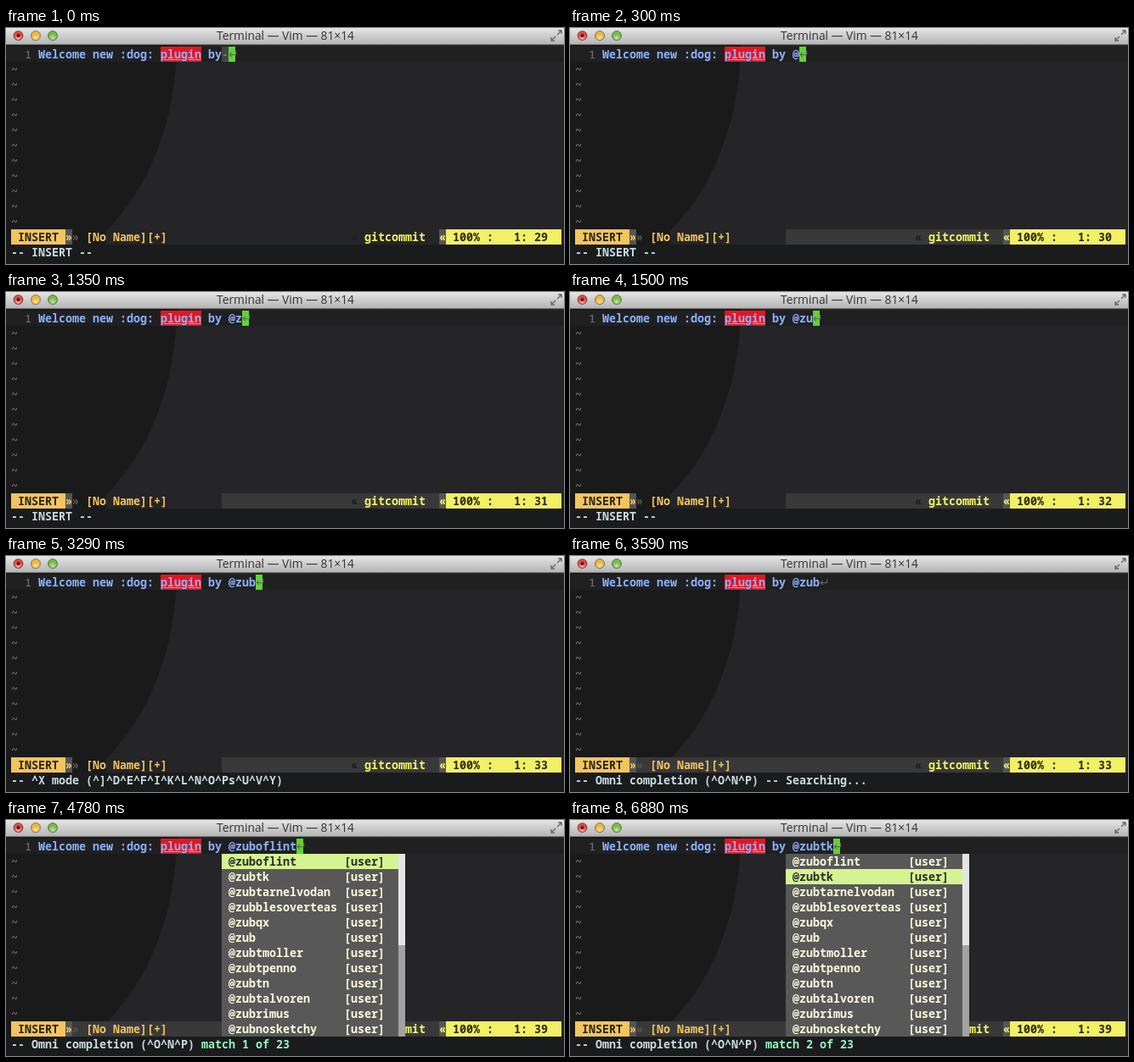
An HTML page that plays this animation: 657 px wide and 279 px high, repeating every 8000 ms.

```html
<!DOCTYPE html>
<html lang="en">
<head>
<meta charset="utf-8">
<title>Terminal</title>
<style>
  html, body { margin: 0; width: 100%; height: 100%; overflow: hidden; background: #1a1a1b; }
  #window { position: relative; width: 657px; height: 279px; overflow: hidden; }
  svg { position: absolute; left: 0; top: 0; }
  .title { font: 13.8px "Open Sans", sans-serif; fill: #333; text-anchor: middle; }
  .cell {
    position: absolute; height: 18px; white-space: pre;
    font: 600 13.3333px/18px "Noto Sans Mono", monospace;
  }
  .return { font: 14px/18px "DejaVu Sans", sans-serif; }
</style>
</head>
<body>
<div id="window">
  <svg width="657" height="279">
    <defs>
      <linearGradient id="bar" x2="0" y2="1">
        <stop stop-color="#e6e6e6"/><stop offset="1" stop-color="#b2b2b2"/>
      </linearGradient>
      <radialGradient id="shine" cy=".8">
        <stop stop-color="#fff" stop-opacity=".6"/><stop offset="1" stop-color="#fff" stop-opacity="0"/>
      </radialGradient>
    </defs>
    <rect width="657" height="279" fill="#252527"/>
    <path d="M0 20H202Q198 90 183 130Q162 195 118 240V256H0Z" fill="#1b1a1a"/>
    <rect y="22" width="657" height="18" fill="#202021"/>
    <rect y="256" width="657" height="23" fill="#1a1b1c"/>
    <rect width="657" height="20" fill="url(#bar)"/>
    <rect y="19" width="657" height="1" fill="#777"/>
    <g stroke="#0006">
      <circle cx="14.5" cy="9" r="5.5" fill="#e8463f"/>
      <circle cx="35" cy="9" r="5.5" fill="#f0b53c"/>
      <circle cx="55" cy="9" r="5.5" fill="#72bd45"/>
    </g>
    <g fill="url(#shine)">
      <circle cx="14.5" cy="9" r="5"/><circle cx="35" cy="9" r="5"/><circle cx="55" cy="9" r="5"/>
    </g>
    <circle cx="14.5" cy="9" r="2" fill="#5c0b0b"/>
    <text class="title" x="329" y="14">Terminal — Vim — 81×14</text>
    <path d="M649 8L654 3M650 3H654V7M647 10L642 15M642 11V15H646" fill="none" stroke="#666" stroke-width="1.4"/>
  </svg>
  <div id="screen"></div>
</div>
<script>
const LOOP = 8000, CELL = 8, ROW = 18, LEFT = 6, TOP = 22;
const screen = document.getElementById("screen");
const users = ["zuboflint", "zubtk", "zubtarnelvodan", "zubblesoverteas", "zubqx", "zub",
  "zubtmoller", "zubtpenno", "zubtn", "zubtalvoren", "zubrimus", "zubnosketchy"].map(name => "@" + name);

const insert = "-- INSERT --", omni = "-- Omni completion (^O^N^P) ";
const steps = [
  { at: 0, typed: "", column: 29, message: insert },
  { at: 300, typed: "@", column: 30, message: insert },
  { at: 1350, typed: "@z", column: 31, message: insert },
  { at: 1500, typed: "@zu", column: 32, message: insert },
  { at: 2400, typed: "@zub", column: 33, message: insert },
  { at: 3290, typed: "@zub", column: 33, message: "-- ^X mode (^]^D^E^F^I^K^L^N^O^Ps^U^V^Y)" },
  { at: 3590, typed: "@zub", column: 33, message: omni + "-- Searching...", busy: true },
  { at: 4780, typed: users[0], column: 39, message: omni, pick: 0 },
  { at: 6880, typed: users[1], column: 39, message: omni, pick: 1 },
];

function put(column, row, text, color, background = "transparent") {
  const cell = document.createElement("span");
  cell.className = "cell";
  cell.textContent = text;
  Object.assign(cell.style, {
    left: LEFT + column * CELL + "px", top: TOP + row * ROW + "px", color, background,
  });
  screen.append(cell);
  return cell;
}

function fill(column, row, columns, rows, color) {
  const box = put(column, row, "", "", color);
  box.style.width = columns * CELL + "px";
  box.style.height = rows * ROW + "px";
}

function drawText({ typed, busy }) {
  const blue = "#8ab2ff", end = 32 + typed.length;
  put(2, 0, "1", "#777").style.fontWeight = 400;
  put(4, 0, "Welcome new :dog: ", blue);
  put(22, 0, "plugin", blue, "#e5151f").style.textDecoration = "underline";
  put(28, 0, " by " + typed, blue);
  if (!typed) put(31, 0, "-", "#777", "#444");
  if (!busy) fill(end, 0, 1, 1, "#5fd42f");
  put(end, 0, "↵", "#666").classList.add("return");
  for (let row = 1; row < 12; row++) put(0, row, "~", "#707070");
}

function drawStatus({ at, column }) {
  // The lighter strip spreads leftwards as the line is redrawn.
  const start = at >= 3590 ? 9 : 31;
  if (at) fill(start, 12, 64 - start, 1, "#39393a");
  put(0, 12, " INSERT ", "#2a2418", "#f2c55f");
  put(8, 12, "»", "#f2c55f", "#555");
  put(9, 12, "»", "#555");
  put(11, 12, "[No Name][+]", "#f2c55f");
  put(50, 12, "«", "#1c1c1c");
  put(52, 12, "gitcommit", "#f4f267");
  put(63, 12, "«", "#f4f267", "#555");
  put(64, 12, ` 100% :   1: ${column}  `, "#2c2c18", "#f2f066");
}

function drawMenu(pick) {
  fill(31, 1, 26, 12, "#585858");
  fill(57, 1, 1, 6, "#e4e4e4");
  fill(57, 7, 1, 6, "#a2a2a2");
  users.forEach((name, i) => {
    const colors = i === pick ? ["#2b2b2b", "#d5f491"] : ["#fdfbdc"];
    put(31, i + 1, " " + name.padEnd(17) + "[user] ".padEnd(8), ...colors);
  });
  put(28, 13, `match ${pick + 1} of 23`, "#92f5be");
}

function draw(step) {
  screen.replaceChildren();
  drawText(step);
  drawStatus(step);
  put(0, 13, step.message, "#c9dce1");
  if (step.pick !== undefined) drawMenu(step.pick);
}

let shown;
function tick() {
  const time = performance.now() % LOOP;
  const step = steps.findLast(s => s.at <= time);
  if (step !== shown) draw(shown = step);
  requestAnimationFrame(tick);
}
tick();
</script>
</body>
</html>
```
